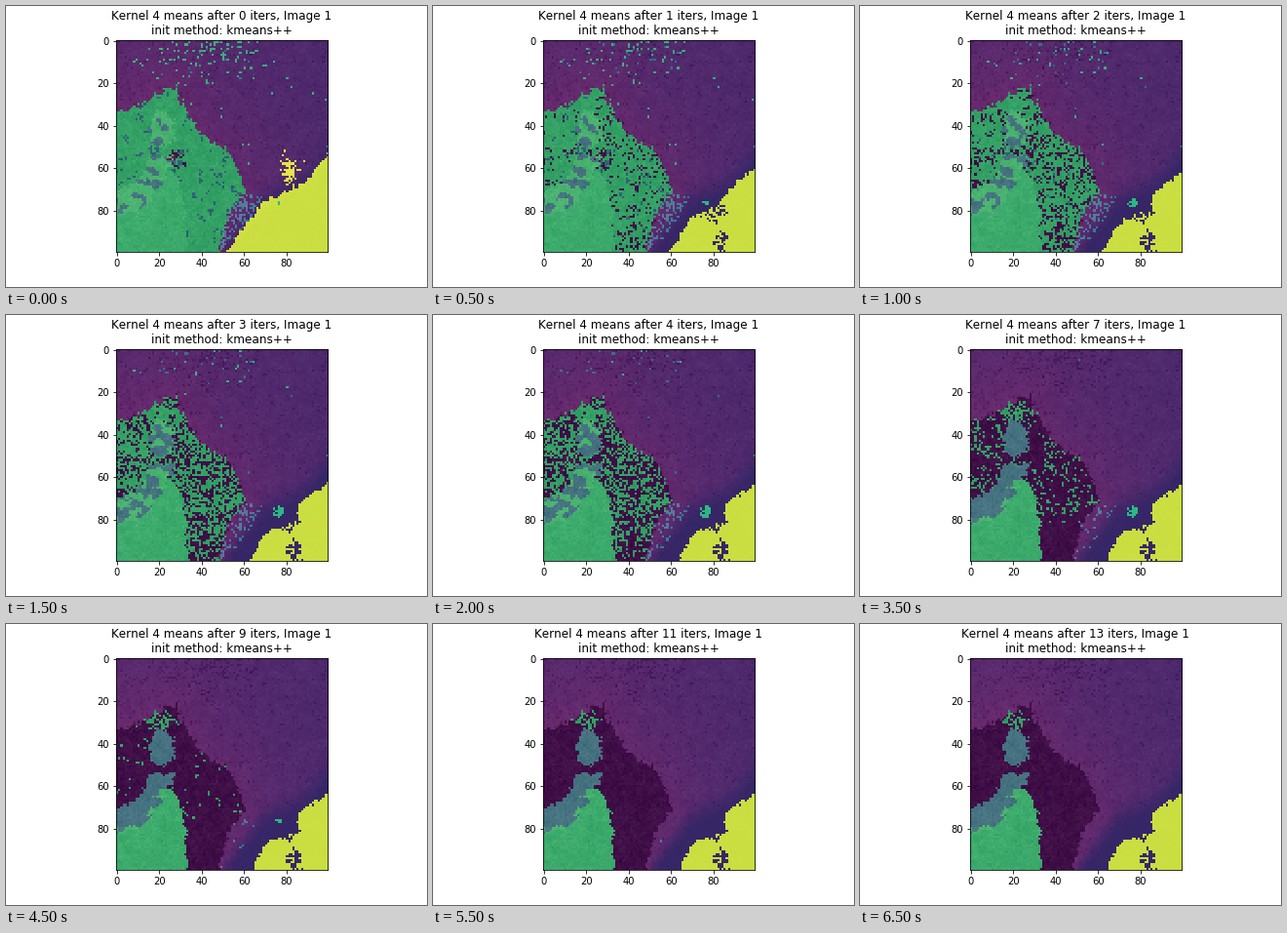
These frames come from a looping animation (432 by 288 pixels, 7 s). A matplotlib script:

```python
import numpy as np
import matplotlib.pyplot as plt
from matplotlib.animation import FuncAnimation
from matplotlib.path import Path

N, ITERS, ALPHA = 100, 14, 0.8
PURPLE, BLUE, GREEN, YELLOW = range(4)
VIRIDIS = np.array([(68, 1, 84), (49, 104, 142), (53, 183, 121), (253, 231, 37)])

rng = np.random.default_rng(7)
Y, X = np.mgrid[0:N, 0:N].astype(float)


def uniform():
    return rng.random((N, N))


def ranked(a):
    return (a.ravel().argsort().argsort() / a.size).reshape(a.shape)


def patchy(weight, passes=1):
    """Noise spread evenly over 0..1; a higher weight gives larger patches."""
    a = rng.normal(size=(N, N))
    for _ in range(passes):
        a = sum(np.roll(a, s, ax) for ax in (0, 1) for s in (-1, 0, 1))
    return ranked(weight * ranked(a) + (1 - weight) * uniform())


wobble_x, wobble_y = (2.4 * (patchy(.7) - .5) for _ in range(2))


def inside(*pts):
    cells = np.c_[(X + wobble_x).ravel(), (Y + wobble_y).ravel()]
    return Path(pts).contains_points(cells).reshape(N, N)


def bump(cx, cy, sx, sy):
    return np.exp(-((X - cx) / sx) ** 2 - ((Y - cy) / sy) ** 2)


def blob(cx, cy, rx, ry):
    return ((X + wobble_x - cx) / rx) ** 2 + ((Y + wobble_y - cy) / ry) ** 2 < 1


def fade(k, end, power=1.0):
    """Falls from 1 at the first iteration to 0 at `end`."""
    return max(0, 1 - k / end) ** power


# regions, in cell coordinates
COAST = [(-5, 34), (6, 33), (14, 28), (27, 22), (30, 28), (35, 38), (42, 47),
         (50, 49.5), (56, 60), (60.5, 71), (53, 82), (49, 93), (48, 105)]
land = inside(*COAST, (-5, 105))
core = inside((-5, 80), (10, 78), (16, 70), (18, 60), (28, 64), (32, 75), (33, 105), (-5, 105))
lake = inside((15, 54), (29, 54), (24, 62), (18, 73), (10, 80), (-5, 82), (-5, 71), (10, 66))
pond = blob(21, 42, 6, 8.5)
fringe = blob(20, 29, 7.5, 3.5)
hollow = blob(28, 56, 3.5, 4.5)
strip = inside((60, 73), (69, 75), (59, 89), (47, 103), (53, 80))
sand_hole = blob(84, 94, 4, 5)

SAND_START = np.array([(51, 100), (69, 76), (80, 71), (88, 67), (99, 54)])
SAND_END = np.array([(63, 100), (70, 87), (84, 82), (86, 72), (99, 64)])


def sand_edge(k):
    pts = SAND_END + (SAND_START - SAND_END) * np.exp(-k)
    return np.interp(X, pts[:, 0], pts[:, 1], left=120)


# fixed noise that decides when each cell changes cluster
u_land, u_sea, u_strip = (patchy(.3) for _ in range(3))
u_patch, u_fine = patchy(.85, 3), uniform()
speck_zone = .24 * bump(44, 2, 17, 7) + .15 * bump(28, 11, 14, 8) + .06 * bump(58, 12, 14, 10) + .002


def coast_distance():
    pts = np.array(COAST, float)
    t = np.linspace(0, len(pts) - 1, 240)
    cx, cy = (np.interp(t, range(len(pts)), pts[:, i]) for i in (0, 1))
    return np.hypot(X[..., None] - cx, Y[..., None] - cy).min(axis=2)


def backdrop():
    """Light that the picture below adds to the cluster colours."""
    shore = np.clip((sand_edge(0) + 4 - Y) / 12, 0, 1)
    red = 23 + 17 * np.exp(-coast_distance() / 15) + 11 * (1 - X / N)
    sea = np.stack([red * shore, 38 + 3 * shore, 36 + 6 * shore], -1)
    grain = rng.normal(0, 2.2, (N, N)) + 5 * (patchy(1, 4) - .5)
    dark = 11 * (uniform() < .07 - .05 * X / N) + 14 * (u_sea < speck_zone)
    sea += ((grain - dark) * (.2 + .8 * shore))[..., None]

    ground = np.where(core[..., None], (18, 24, 11), (9, 14, 4))
    ground = np.where((pond | lake)[..., None], (31, 31, 15), ground)
    ground = ground + rng.normal(0, 1, (N, N, 1)) * (5, 3, 2)
    ground += 7 * (patchy(1, 4) - .5)[..., None]
    return np.where(land[..., None], ground, sea).clip(0, 60)


base = backdrop()


def labels(k):
    lab = np.full((N, N), PURPLE)

    # specks along the top turn blue, then vanish
    speck = ~land & (Y < 75) & (u_sea < speck_zone * fade(k, 7.5, 1.8))
    lab[speck] = np.where(u_fine < .15 + k / 6, BLUE, GREEN)[speck]

    # channel between land and sand
    lab[strip & ~land & (u_strip < .45 * fade(k, 12, 1.3))] = BLUE

    # land breaks up into specks, fastest in the south east and between the lakes
    east = X > 31.5
    keep = np.where(east, fade(k, 10, 1.4), fade(k, 9.5, 1.2))
    dry = .2 * east * np.clip((Y - 74) / 12, 0, 1) + .3 * bump(29, 46, 4, 7)
    lab[land & (u_land + dry * min(k / 3, 1) < keep)] = GREEN
    lab[fringe & land & (u_land < .42 + .55 * fade(k, 12))] = GREEN
    lab[core] = GREEN

    wet = (pond | lake) & ~(core & (u_patch > .6))
    lab[wet] = np.where(u_patch < .3 + .1 * k, BLUE, GREEN)[wet]
    lab[hollow & (u_fine < .6 * fade(k, 3))] = PURPLE
    lab[land & ~core & (u_patch < .12 * fade(k, 3)) & (u_fine < .5)] = BLUE

    # sand
    sand = (X > 48) & (Y > sand_edge(k) + wobble_y)
    lab[sand] = YELLOW
    settled = 1 - np.exp(-k)
    lab[sand & blob(80, 80, 6, 5) & (u_land < .65 * settled)] = PURPLE
    lab[sand_hole & (u_land < .6 * settled)] = PURPLE
    lab[u_fine < .9 * bump(81.5, 62, 3, 6) * fade(k, 1)] = YELLOW
    size = 3 * np.sin(np.pi * min(k + 1, 12) / 12)
    lab[(np.hypot(X - 76, Y - 76.5) < size) & (u_fine < .7)] = GREEN
    return lab


def picture(k):
    return (ALPHA * VIRIDIS[labels(k)] + base).clip(0, 255).astype(np.uint8)


plt.rcParams.update({"font.family": "DejaVu Sans", "font.size": 10,
                     "text.kerning_factor": 6})
fig, ax = plt.subplots(figsize=(6, 4), dpi=72)
fig.subplots_adjust(left=.125, right=.9, bottom=.125, top=.88)
im = ax.imshow(picture(0), interpolation="nearest")
ax.set_xticks(range(0, N, 20))
ax.set_yticks(range(0, N, 20))
title = ax.set_title("", fontsize=12)


def update(k):
    im.set_data(picture(k))
    title.set_text(f"Kernel 4 means after {k} iters, Image 1\ninit method: kmeans++")
    return im, title


anim = FuncAnimation(fig, update, frames=ITERS, init_func=lambda: update(0),
                     interval=500, repeat=True, repeat_delay=0, blit=False)
plt.show()
```
